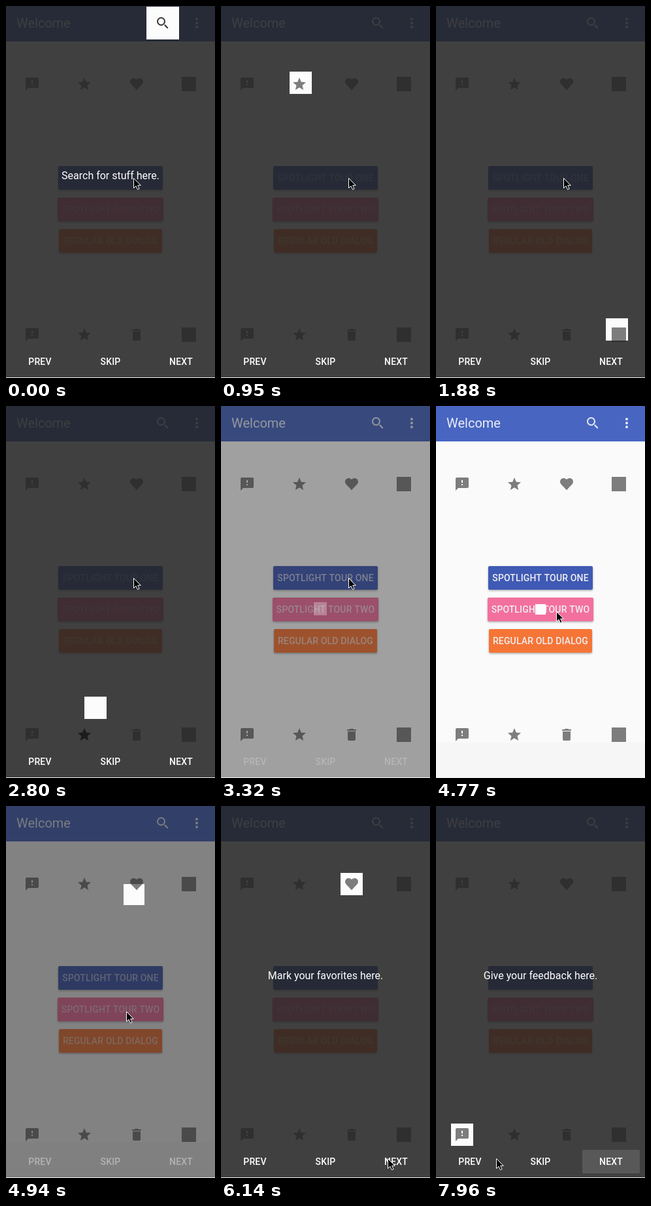
Recreate the animation shown at these times as an HTML page with a canvas. Size 320x567 px, loop 8 s.

```html
<!DOCTYPE html>
<html lang="en">
<head>
<meta charset="utf-8">
<title>Spotlight tour</title>
<style>
html, body { margin: 0; width: 100%; height: 100%; overflow: hidden; background: #fafafa; }
canvas { display: block; width: 320px; height: 567px; }
</style>
</head>
<body>
<canvas id="stage"></canvas>
<script>
const W = 320, H = 567, LOOP = 8000;
const canvas = document.getElementById('stage');
const ctx = canvas.getContext('2d');
const ratio = window.devicePixelRatio || 1;
canvas.width = W * ratio;
canvas.height = H * ratio;

const INK = '#7d7d7d', DARK = '#1c1c1c', VEIL = '#222';

const clamp = v => Math.min(1, Math.max(0, v));
const part = (t, a, b) => clamp((t - a) / (b - a));
const lerp = (a, b, p) => a + (b - a) * p;
const smooth = p => p * p * (3 - 2 * p);

// Each icon adds its outline in a 24 px box.
const icons = {
  feedback() {
    ctx.roundRect(2, 2, 20, 16, [2, 2, 2, 0]);
    polygon([[2, 18], [6, 18], [2, 22]]);
    ctx.rect(11, 6, 2, 4);
    ctx.rect(11, 12, 2, 2);
  },
  star() {
    polygon(Array.from({ length: 10 }, (_, i) => {
      const r = i % 2 ? 4.78 : 10.5, a = i * Math.PI / 5;
      return [12 + r * Math.sin(a), 12.5 - r * Math.cos(a)];
    }));
  },
  heart() {
    ctx.moveTo(12, 21.3);
    for (const s of [-1, 1]) {
      const x = v => 12 + s * v;
      ctx.moveTo(12, 21.3);
      ctx.bezierCurveTo(x(5), 15.2, x(10), 12.3, x(10), 8.5);
      ctx.bezierCurveTo(x(10), 3, x(3.5), 1, 12, 5.1);
    }
  },
  bin() {
    ctx.roundRect(6, 7, 12, 14, [0, 0, 2, 2]);
    ctx.rect(5, 4, 14, 2);
    ctx.rect(9, 3, 6, 1);
  },
  square() {
    ctx.rect(1, 1, 22, 22);
  },
  search() {
    for (const r of [6.5, 4.5]) {
      ctx.moveTo(9.5 + r, 9.5);
      ctx.arc(9.5, 9.5, r, 0, 7);
    }
    polygon([[14, 15.5], [15.5, 14], [20.5, 19], [19, 20.5]]);
  },
  dots() {
    for (const y of [6, 12, 18]) {
      ctx.moveTo(14, y);
      ctx.arc(12, y, 2, 0, 7);
    }
  }
};
const rows = [
  ['feedback', 'star', 'heart', 'square'],
  ['feedback', 'star', 'bin', 'square']
];
const buttons = [
  ['SPOTLIGHT TOUR ONE', 160, '#3f5ab4'],
  ['SPOTLIGHT TOUR TWO', 162, '#f3709e'],
  ['REGULAR OLD DIALOG', 158, '#f57536']
];

const cell = (col, row) => ({ x: 40 + 80 * col, y: 119 + 382 * row, size: 34 });
const button = i => ({ x: 160, y: 262 + 48 * i, size: 16 });

const stops = [
  [-1000, { x: 240, y: 26, size: 50 }],
  [720, cell(1, 0)],
  [1660, cell(3, 1)],
  [2060, cell(3, 0)],
  [2690, cell(1, 1)],
  [3250, button(0)],
  [4000, button(1)],
  [4815, cell(2, 0)],
  [7390, cell(0, 1)]
];

// Pointer: start time, end time, x, y.
const moves = [
  [3780, 4140, 191, 368],
  [4140, 4420, 184, 313],
  [5350, 6140, 255, 537],
  [6200, 6430, 260, 537],
  [7450, 7960, 92, 537]
];

// Text, fade-in start, end.
const messages = [
  ['Search for stuff here.', -200, 720],
  ['Mark your favorites here.', 4950, 7390],
  ['Give your feedback here.', 7580, LOOP]
];

function dimAt(t) {
  if (t < 4770) return (1 - part(t, 3200, 3600)) ** 2;
  return 1 - (1 - part(t, 4790, 5170)) ** 2;
}

function spotAt(t) {
  const i = stops.findLastIndex(s => s[0] <= t);
  const [start, to] = stops[i];
  const from = stops[Math.max(0, i - 1)][1];
  const p = 1 - Math.exp(-(t - start + 37) / 66);
  const size = lerp(from.size, to.size, p);
  return [lerp(from.x, to.x, p) - size / 2, lerp(from.y, to.y, p) - size / 2, size].map(Math.round);
}

function pointerAt(t) {
  let x = 195, y = 262;
  for (const [a, b, toX, toY] of moves) {
    const p = smooth(part(t, a, b));
    x = lerp(x, toX, p);
    y = lerp(y, toY, p);
  }
  return [Math.round(x), Math.round(y)];
}

function polygon(points) {
  points.forEach(([x, y], i) => i ? ctx.lineTo(x, y) : ctx.moveTo(x, y));
  ctx.closePath();
}

function icon(name, x, y, color) {
  ctx.save();
  ctx.translate(x - 12, y - 12);
  ctx.beginPath();
  icons[name]();
  ctx.fillStyle = color;
  ctx.fill('evenodd');
  ctx.restore();
}

function text(str, x, y, font, color, align = 'center', spacing = 0) {
  ctx.font = `${font} Roboto, sans-serif`;
  ctx.letterSpacing = spacing + 'px';
  ctx.textAlign = align;
  ctx.fillStyle = color;
  ctx.fillText(str, x, y);
}

function box(x, y, w, h, color, radius = 0) {
  ctx.fillStyle = color;
  ctx.beginPath();
  ctx.roundRect(x, y, w, h, radius);
  ctx.fill();
}

// Runs a drawing step at a given opacity.
function fade(alpha, step) {
  ctx.save();
  ctx.globalAlpha = alpha;
  step();
  ctx.restore();
}

function iconRows() {
  rows.forEach((names, row) => names.forEach((name, col) => {
    const { x, y } = cell(col, row);
    icon(name, x, y, INK);
  }));
}

function page(d, said) {
  box(0, 0, W, H, '#fafafa');
  box(0, 0, W, 54, '#4866c1');
  text('Welcome', 16, 33, '400 20px', '#e9ecf6', 'left');
  icon('search', 240, 26, '#e9ecf6');
  icon('dots', 292, 26, '#e9ecf6');
  iconRows();
  buttons.forEach(([label, w, color], i) => {
    const { x, y } = button(i);
    ctx.save();
    ctx.shadowColor = 'rgba(0,0,0,.32)';
    ctx.shadowBlur = 3 * ratio;
    ctx.shadowOffsetY = 1.5 * ratio;
    box(x - w / 2, y - 18, w, 36, color, 2);
    ctx.restore();
    fade((1 - 0.6 * d) * (i ? 1 : 1 - said), () =>
      text(label, x, y + 5, '500 14px', '#f0eef2', 'center', 0.15));
  });
  fade(0.86 * d, () => box(0, 0, W, H, VEIL));
}

function spotlight(t, d) {
  const closing = t > 3200 && t < 4770;
  const starDark = t >= 2690 && t < 3210;
  const star = cell(1, 1);
  if (starDark) icon('star', star.x, star.y, DARK);
  fade(closing ? d ** 1.7 : 1, () => {
    const [x, y, size] = spotAt(t);
    ctx.beginPath();
    ctx.rect(x, y, size, size);
    ctx.clip();
    box(x, y, size, size, '#fcfcfc');
    icon('search', 240, 26, '#333');
    iconRows();
    if (starDark) icon('star', star.x, star.y, DARK);
  });
}

function controls(t, d) {
  if (t >= 4770 && t < 5000) box(0, 513, W, 53, 'rgba(0,0,0,.015)');
  fade(part(t, 7380, 7480), () => box(224, 524, 88, 36, '#585858', 2));
  fade(d * d, () => ['PREV', 'SKIP', 'NEXT'].forEach((label, i) =>
    text(label, 52 + i * 108, 547, '500 14px', '#fff', 'center', 0.15)));
}

function pointer(t) {
  const [x, y] = pointerAt(t);
  ctx.save();
  ctx.translate(x + 0.5, y + 0.5);
  ctx.beginPath();
  polygon([[0, 0], [0, 15], [3.5, 11.8], [6, 17.2], [8.6, 16], [6.2, 10.8], [10.8, 10.8]]);
  ctx.fillStyle = '#000';
  ctx.fill();
  ctx.strokeStyle = '#fff';
  ctx.stroke();
  ctx.restore();
}

function draw(t) {
  ctx.setTransform(ratio, 0, 0, ratio, 0, 0);
  const d = dimAt(t);
  const message = messages.find(([, from, to]) => t >= from && t < to);
  const said = message ? part(t, message[1], message[1] + 180) : 0;
  page(d, said);
  spotlight(t, d);
  controls(t, d);
  if (message) fade(said, () => text(message[0], 160, 264, '400 16px', '#fff'));
  box(0, 566, W, 1, '#eee');
  pointer(t);
}

const begin = performance.now();
function tick() {
  draw(Math.max(0, performance.now() - begin) % LOOP);
  requestAnimationFrame(tick);
}
tick();
</script>
</body>
</html>
```
